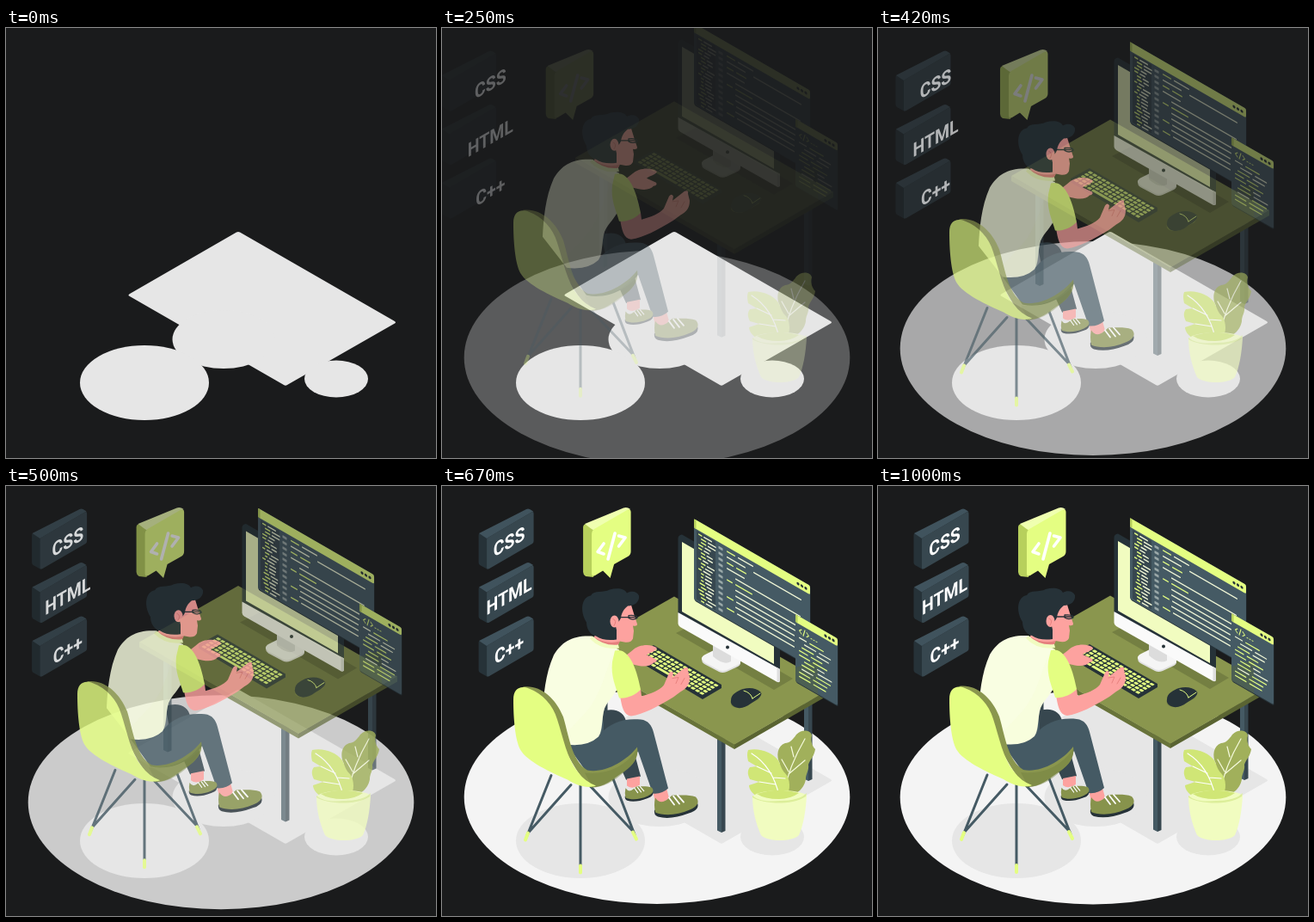
These frames come from a looping animation (500x500 px, 1.04 s). An HTML page:

```html
<!DOCTYPE html>
<html lang="en">
<head>
<meta charset="utf-8">
<style>
  html, body { margin: 0; width: 100%; height: 100%; overflow: hidden; background: #1a1b1c; }
  svg { display: block; width: 100%; height: 100%; }
  .lime { fill: #e4fe82; } .olive { fill: #8a964e; } .moss { fill: #68733a; }
  .slate { fill: #455a64; } .steel { fill: #37474f; } .ink { fill: #263238; }
  .skin { fill: #fda29f; } .cream { fill: #f9fee2; } .pale { fill: #f1fcc0; }
  .line { fill: none; stroke-linecap: round; stroke-linejoin: round; }
  .label { font: 700 22.5px Roboto, Arial, sans-serif; fill: #fff; text-anchor: middle; }
</style>
</head>
<body>
<svg viewBox="0 0 500 500" xmlns="http://www.w3.org/2000/svg">
  <!-- data-move: start offset x, y and opacity power -->
  <g data-move="0 30 1"><ellipse cx="250" cy="362" rx="224.3" ry="124.5" fill="#f4f4f4"/></g>

  <g fill="#e6e6e6">
    <path d="M144 309 L268 237.5 Q270 236.300 272 237.500 L452 341 Q454 342.500 452 343.500 L327 415 Q325 416.300 323 415 L143 311.500 Q141.500 310.500 144 309Z"/>
    <ellipse cx="253" cy="362" rx="59.500" ry="34"/>
    <ellipse cx="161" cy="412.500" rx="75" ry="43.500"/>
    <ellipse cx="384" cy="408" rx="37" ry="21.500"/>
  </g>

  <g data-move="0 -60 2">
    <g id="deskLegs"></g>
    <path class="moss" d="M155 193 L340 299 V305 L155 199Z"/>
    <path fill="#5a6432" d="M340 299 L455 233 V239 L340 305Z"/>
    <path class="olive" d="M270 127.500 L455 233 L340 299.500 L155 193Z"/>
    <path fill="#747f42" d="M272 170 L296 158 L408 223 L386 236Z"/>
  </g>

  <g data-move="0 -60 2">
    <path d="M246 187 L325 233 L303 246 L224 200Z" fill="#1c262b"/>
    <path class="ink" d="M246 184 L325 230 V234 L303 247 L224 200 V196Z"/>
    <g id="keys" class="lime" transform="matrix(.866 .5 -.866 .5 246 185.500)"></g>
    <path d="M336 249 Q334 258 349 257 L368 247 L372 240Z" fill="#747f42"/>
    <path class="ink" d="M336 248 C336 241 344 237 350 235 C358 233 366 234 371 239 C373 244 365 248 359 252 C352 257 345 259 339 255 Q335 252 336 248Z"/>
    <path class="line" stroke="#e4fe82" stroke-width="1" d="M351 237 Q359 239 361 246 M361 246 L370 240"/>
  </g>

  <g data-move="0 -60 2">
    <path fill="#e0e0e0" d="M302 201 Q301 198 306 196 L322 188 L346 202 Q349 206 344 209 L331 215 Q326 217 322 215 L305 206 Q302 204 302 201Z"/>
    <path fill="#f5f5f5" d="M302 200 Q302 197 306 195 L322 187 L346 201 Q349 204 344 207 L331 213 Q326 215 322 213 L305 204Z"/>
    <path fill="#dcdcdc" d="M315 181 L336 192 V203 Q327 208 315 197Z"/>
    <path class="ink" d="M274.500 60 Q274.500 56 279 55.500 L393 121 V213 L274.500 147Z"/>
    <path fill="#fafafa" d="M274.500 146 L393 212 V226 Q392 228 389 226.500 L277 163 Q274.500 161 274.500 159Z"/>
    <path fill="#dedede" d="M389.500 210 L393 212 V226 L389.500 227Z"/>
    <path class="pale" d="M279 64 L386 126 V206 L279 145Z"/>
    <circle class="ink" cx="332" cy="186.500" r="2"/>
    <g id="editor"></g>
    <g id="panel"></g>
  </g>

  <g data-move="-60 0 2">
    <path fill="#b7d05c" d="M163 48 Q163 45 166 44 L175 49 V106 L166 105 Q163 103 163 100Z"/>
    <path fill="#efffb0" d="M165 44 L210 25.500 Q214 24 218 27 L176 52 Q171 49 165 44Z"/>
    <path class="lime" d="M173 56 Q173 52 176 50 L214 28 Q218.500 26 218.500 30 V76 Q218.500 80 215 82 L199 91 L194.500 107 L186 98.500 L177 104 Q173 106 173 102Z"/>
    <path class="line" stroke="#fff" stroke-width="3.600" d="M187 67 L180 76.500 L187 79 M200 55 L192 85 M204.500 58 L212 60 L204.500 70"/>
  </g>

  <g data-move="-60 0 2" id="boxes"></g>
  <g data-move="-30 0 1" id="labels"></g>

  <g data-move="0 0 1">
    <path fill="#a1b05b" d="M389 362 C387 343 389 329 393 323 C388 314 390 302 399 299 C404 299 408 295 412 289 C419 282 429 284 430 290 C428 297 431 303 434 306 C433 314 428 318 426 324 C427 331 423 334 423 341 C421 354 409 360 398 363Z"/>
    <path class="line" stroke="#f5fadc" stroke-width="1.200" d="M397 358 C401 338 408 318 422 294 M403 335 L422 319 M403 332 L395 318 M409 315 L406 303"/>
    <path fill="#d0e676" d="M356 307 C368 304 384 309 391 319 C394 324 394 329 399 334 C405 340 406 354 400 361 L371 363 C362 360 357 353 357 348 L369 344 L358 341 C355 335 355 331 358 327 L366 326 L356 320 Q354 312 356 307Z"/>
    <path class="line" stroke="#fff" stroke-width="1.200" d="M360 311 C376 321 387 338 392 360 M385 339 L399 340 M383 334 L366 326 M388 347 L369 344"/>
    <path fill="#f1fcc0" d="M361 361 C370 352 415 352 424 360 C423 378 420 395 415 406 C407 414 379 414 371 406 C365 393 361 377 361 361Z"/>
    <path fill="#dcee9a" d="M361 360 C369 367 382 367 393 366 C407 366 419 363 424 357 L423 361 C414 367 402 368.500 392 368.500 C379 368.500 367 366 361 362Z"/>
    <path fill="#d0e676" d="M366 358 Q392 350 415 357 Q405 364 392 364 Q375 364 366 358Z"/>
  </g>

  <g data-move="0 -30 1">
    <path class="skin" d="M221 191 C229 183 244 183 250 188 C249 192 241 193 238 196 L249 201 Q251 204 246 205 C242 210 233 210 222 207 L212 198Z"/>
    <path class="steel" d="M185 262 C200 256 213 262 214 274 L231 337 Q222 344 214 341 L191 290Z"/>
    <path class="skin" d="M215 340 L230 337 L230 347 Q221 353 215 348Z"/>
    <path class="skin" d="M245 354 L261 351 L264 362 Q256 371 248 367Z"/>
    <path class="slate" d="M145 300 L184 288 C195 275 211 269 231 271 C240 272 244 278 246 286 L263 351 Q256 358 245 357 L228 308 C216 326 190 337 168 332Z"/>
    <g id="shoe">
      <path class="ink" d="M247 376 Q272 385 297 368 Q300 376 287 380 Q266 388 251 384 Q246 382 247 376Z"/>
      <path fill="#87934c" d="M248 362 Q254 371 263 363 L268 359 C278 359 288 358 295 361 C300 366 298 372 288 376 C273 383 257 383 248 379 Q246 370 248 362Z"/>
      <path class="line" stroke="#fff" stroke-width="1.800" d="M264 362 L270 370 M269 360 L276 369 M274 359 L281 367"/>
    </g>
    <use href="#shoe" transform="translate(53.500 111.800) scale(.645 .66)"/>
    <path class="cream" d="M174 174 C151 173 139 181 130 196 C120 218 118 244 117 264 L145 300 Q169 303 182 291 C188 282 185 263 191 254 C196 246 203 240 205 232 L206 190Z"/>
    <path fill="#f4fbcf" d="M199 195 C188 220 184 246 164 266 Q147 284 139 293 L160 300 Q176 299 184 288 C188 278 185 263 191 254 L204 235Z" opacity=".3"/>
    <path class="skin" d="M207 243 L231 236 L232 244 C243 241 253 237 258 231 L264 217 Q267 213 269 217 L268 222 L282 211 Q287 209 286 214 L288 222 C288 231 284 235 277 239 L269 245 C251 256 234 265 220 267 C211 266 209 256 207 243Z"/>
    <path class="line" stroke="#e8827f" stroke-width="1" d="M268 223 L275 222 L272 229 M282 223 L278 230"/>
    <path class="lime" d="M201 191 C215 187 225 205 231 236 C225 243 214 247 206 246 C202 232 196 221 198 204Z"/>
    <path class="skin" d="M183 158 L176 178 Q190 188 204 186 L207 179Z"/>
    <path fill="#e57f7d" d="M178 176 Q192 184 207 180 L204 185 Q189 186 176 179Z"/>
    <path class="pale" d="M175 174 Q188 186 205 184 L206 188 Q185 191 172 177Z"/>
    <path class="skin" d="M195 152 Q208 134 220 138 L224 151 L227 160 Q227 163 222 162 L223 168 L222 177 Q220 182 212 181 L201 179 L187 170Z"/>
    <path class="ink" d="M179 174 C171 172 168 164 168 158 C160 145 162 129 173 127 C177 120 188 124 195 120 C203 118 212 118 215 124 C220 121 227 122 229 127 C230 134 224 139 216 139 C211 143 209 147 208 153 Q205 160 201 158 L203 167 L203 178 Q188 180 179 174Z"/>
    <ellipse class="skin" cx="200.500" cy="157" rx="5" ry="7"/>
    <path class="line" stroke="#e57f7d" stroke-width="1" d="M199 154 Q204 156 200 162"/>
    <path class="line" stroke="#263238" stroke-width="1.300" d="M205 152 L224 152 M217 150 Q227 149 227 153 Q222 156 217 153Z"/>
  </g>

  <g data-move="0 -30 1">
    <path class="line" stroke="#455a64" stroke-width="3" d="M127 336 L99 406 M150 347 L100 403 M199 340 L224 405 M171 347 L223 402 M161 346 V446"/>
    <path class="line" stroke="#e4fe82" stroke-width="4" d="M161 441 V449 M100 403 L97 411 M222 402 L226 410"/>
    <path class="olive" d="M94 233 C113 230 132 245 141 268 C148 292 151 319 169 330 C188 334 214 320 227 303 C229 315 223 324 211 332 C198 341 188 350 174 350 C155 341 118 247 94 233Z"/>
    <path fill="#727e3e" d="M166 333 Q204 337 227 306 Q229 317 213 331 Q193 350 175 350Z" opacity=".45"/>
    <path class="lime" d="M83 248 C83 235 91 231 101 235 C117 241 129 254 134 271 C141 292 145 316 158 332 Q166 343 179 348 C168 352 156 347 146 341 C126 332 99 320 91 306 C85 294 83 270 83 248Z"/>
  </g>
</svg>
<script>
const LOOP = 1040, FPS = 24;
const SLOPE = 0.577;
const byId = id => document.getElementById(id);
const rect = (x, y, w, h, fill, rx = 0) =>
  `<rect x="${x}" y="${y}" width="${w}" height="${h}" rx="${rx}"${fill ? ` fill="${fill}"` : ""}/>`;
const LIME = "#e4fe82", PALE = "#f2f8d8", SLATE = "#455a64", STEEL = "#37474f";

function seeded(seed) {
  return () => (seed = (seed * 16807) % 2147483647) / 2147483647;
}

function drawDeskLegs() {
  const leg = (x, top, bottom) =>
    `<path class="slate" d="M${x} ${top}h5V${bottom + 2}l-5 -2.500Z"/>` +
    `<path class="steel" d="M${x + 5} ${top}h4.500V${bottom}l-4.500 2Z"/>`;
  byId("deskLegs").innerHTML = leg(183, 200, 319) + leg(421, 240, 340) + leg(320, 288, 400);
}

function drawKeys() {
  let out = "";
  for (let row = 0; row < 5; row++)
    for (let col = 0; col < 15; col++)
      if (row < 4 || col < 4 || col > 8) out += rect(2 + col * 5.9, 1.5 + row * 4.7, 4.5, 3.3, "", .7);
  byId("keys").innerHTML = out + rect(25.6, 20.3, 28, 3.3, "", .7);
}

// Window in its own flat coordinates, sheared into the isometric plane.
function windowFrame(x, y, w, h, bar, content) {
  const dots = [14, 9.5, 5].map(d => `<circle class="ink" cx="${w - d}" cy="${bar / 2 + .5}" r="1.600"/>`).join("");
  return `<g transform="matrix(1 ${SLOPE} 0 1 ${x} ${y})">` +
    rect(.5, 1, w, h, "#263238", 2) + rect(0, 0, w, h, SLATE, 2) +
    rect(0, 0, w, bar, LIME, 2) + rect(0, 0, 2.5, bar, "#b7d05c", 1) + dots + content + "</g>";
}

function drawEditor() {
  const rand = seeded(41);
  let out = rect(3, 12, 22, 80, STEEL);
  for (let v = 14; v < 91; v += 4) {
    const indent = 5 + Math.floor(rand() * 3) * 1.5, cut = 3 + rand() * 4;
    out += rect(indent, v, cut, 1.6, LIME, .8) + rect(indent + cut + 1.5, v, 6 + rand() * 4, 1.6, PALE, .8);
  }
  for (let v = 15; v < 90; v += 6.5) out += rect(28.5, v, 5, 3, "#9aa8a8", .5);
  // row, start, length, tone
  const code = [
    [0, 38, 10, LIME], [0, 51, 18, PALE], [1, 38, 22, PALE], [1, 69, 56, PALE],
    [2, 38, 8, LIME], [2, 49, 12, LIME], [3, 38, 21, PALE], [4, 48, 76, PALE],
    [5, 38, 7, LIME], [5, 48, 20, LIME], [6, 48, 74, PALE], [7, 48, 70, PALE],
    [8, 38, 8, LIME], [8, 49, 68, PALE], [9, 48, 69, PALE], [10, 38, 9, LIME], [10, 50, 67, PALE]
  ];
  for (const [row, u, len, tone] of code) out += rect(u, 15 + row * 6.6, len, 1.5, tone, .7);
  byId("editor").innerHTML = windowFrame(293, 37, 135, 94, 10.5, out);
}

function drawPanel() {
  const rand = seeded(17);
  let out = `<path fill="#55643f" opacity=".45" d="M0 62L26 39V78H0Z"/>` +
    `<path class="line" stroke="${LIME}" stroke-width="1" d="M7 14l-2.500 2.500l2.500 2.500M11 12.500l-2 7.500M13 14l2.500 2.500l-2.500 2.500M18 18h1M21 18h1M24 18h1"/>`;
  for (let v = 24; v < 72; v += 5) {
    const u = 4 + Math.floor(rand() * 3) * 3, len = 7 + rand() * 9;
    out += rect(u, v, len, 1.4, rand() < .5 ? LIME : PALE, .7);
    out += rect(u + len + 3, v, 8 + rand() * 11, 1.4, rand() < .5 ? LIME : PALE, .7);
  }
  byId("panel").innerHTML = windowFrame(411, 148, 49, 78, 9, out);
}

function drawLabels() {
  const words = ["CSS", "HTML", "C++"];
  byId("boxes").innerHTML = words.map((_, i) => `<g transform="translate(0 ${i * 62.5})">
    <path class="ink" d="M41.500 57Q41.500 55 43 55L52 60V97L43 92Q41.500 91 41.500 89Z"/>
    <path fill="#40535d" d="M42 55L97 27Q99 26 101 27L105 29.500L51 61Z"/>
    <path class="steel" d="M51 62Q51 60.500 53 59.500L103 30.500Q105.500 29 105.500 32V64Q105.500 66 104 67L54 96Q51 97.500 51 95Z"/></g>`).join("");
  byId("labels").innerHTML = words.map((word, i) =>
    `<text class="label" transform="matrix(.866 -.5 0 1 77.500 ${64.5 + i * 62.7})" y="8">${word}</text>`).join("");
}

// Cubic bezier (.36, -.01, .5, 1.38): rises past its end and settles back.
function ease(t) {
  if (t >= 1) return 1;
  const curve = (a, b, s) => 3 * a * s * (1 - s) ** 2 + 3 * b * s * s * (1 - s) + s ** 3;
  let lo = 0, hi = 1;
  for (let i = 0; i < 24; i++) {
    const mid = (lo + hi) / 2;
    if (curve(.36, .5, mid) < t) lo = mid; else hi = mid;
  }
  return curve(-.01, 1.38, lo);
}

drawDeskLegs();
drawKeys();
drawEditor();
drawPanel();
drawLabels();

const movers = [...document.querySelectorAll("[data-move]")].map(node => {
  const [dx, dy, power] = node.dataset.move.split(" ").map(Number);
  return { node, dx, dy, power };
});

function render(ms) {
  const step = Math.floor((ms % LOOP + 4) * FPS / 1000);
  const e = step < 2 ? 0 : ease(step / FPS + .036);
  const alpha = Math.max(0, Math.min(1, e));
  for (const { node, dx, dy, power } of movers) {
    node.setAttribute("transform", `translate(${dx * (1 - e)} ${dy * (1 - e)})`);
    node.setAttribute("opacity", alpha ** power);
  }
}

const start = performance.now();
function tick() {
  render(performance.now() - start);
  requestAnimationFrame(tick);
}
tick();
</script>
</body>
</html>
```
